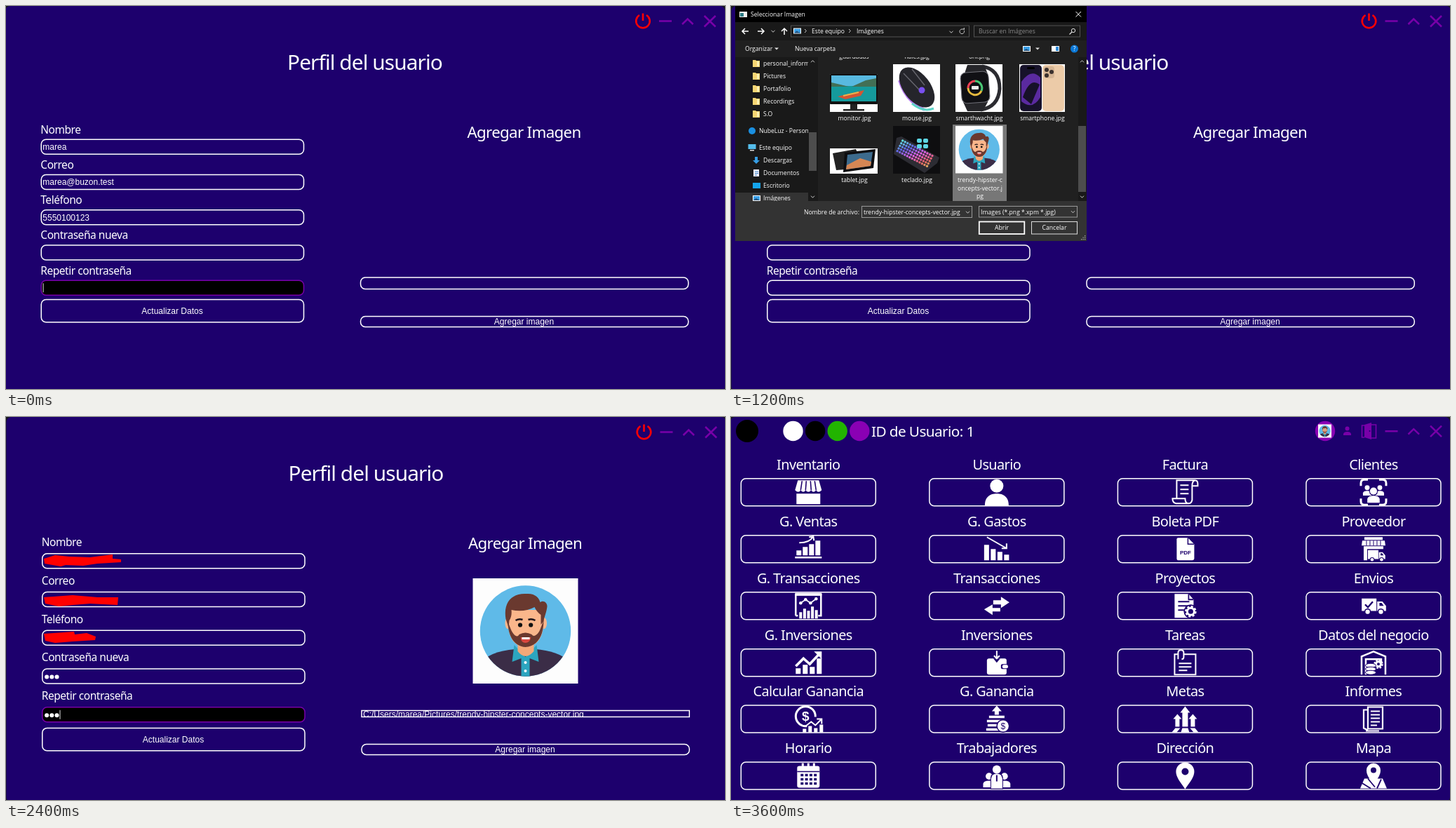
Recreate the animation shown at these times as an HTML page. Size 1025 by 546 pixels, loop 4.2 s.

```html
<!DOCTYPE html>
<html lang="es">
<head>
<meta charset="utf-8">
<title>Perfil del usuario</title>
<style>
html, body { margin: 0; width: 100%; height: 100%; overflow: hidden; background: #17171c; }
svg { display: block; }
text { fill: #fff; white-space: pre; }
.ui { font-family: "Noto Sans", "Open Sans", sans-serif; letter-spacing: -.03em; }
.in { font-family: "Liberation Sans", Arial, sans-serif; }
.os { font-family: "Open Sans", "Noto Sans", sans-serif; }
</style>
</head>
<body>
<svg id="stage" width="100%" height="100%" viewBox="0 0 1025 546"></svg>
<script>
const stage = document.getElementById('stage');
const NAVY = '#1d006d', PURPLE = '#7800a8', STEP = 600;

// y is the middle of the capitals
const text = (x, y, s, size, cls, anchor = 'start', fill = '#fff') =>
  `<text x="${x}" y="${y + size * .36}" class="${cls}" font-size="${size}" text-anchor="${anchor}" style="fill:${fill}">${s}</text>`;
const rect = (x, y, w, h, fill, r = 0, extra = '') =>
  `<rect x="${x}" y="${y}" width="${w}" height="${h}" rx="${r}" fill="${fill}" ${extra}/>`;
const frame = (x, y, w, h, r = 6.75, fill = 'none', stroke = '#fff', sw = 1.5) =>
  rect(x, y, w, h, fill, r, `stroke="${stroke}" stroke-width="${sw}"`);
const disc = (x, y, r, fill) => `<circle cx="${x}" cy="${y}" r="${r}" fill="${fill}"/>`;
const fill = (d, c = '#fff') => `<path d="${d}" fill="${c}"/>`;
const line = (d, w = 2, c = '#fff', extra = '') =>
  `<path d="${d}" fill="none" stroke="${c}" stroke-width="${w}" ${extra}/>`;
const group = (x, y, body, more = '') => `<g transform="translate(${x} ${y})${more}">${body}</g>`;
const clip = (x, y, w, h, body) =>
  `<svg x="${x}" y="${y}" width="${w}" height="${h}" viewBox="${x} ${y} ${w} ${h}">${body}</svg>`;

const backdrop = rect(-1, 0, 1026, 549, NAVY, 7);

const windowButtons =
  line('M931 21.5H949M964 26L971.7 18.5L979.5 26M995.5 14L1011.5 29.5M1011.5 14L995.5 29.5', 2.5, PURPLE);
const power = line('M903 13A9.8 9.8 0 1 0 913 13M908 10.5V21', 2.6, '#f00');

function avatar(x, y, size) {
  const skin = '#fab68b', hair = '#6a392f';
  return group(x, y,
    rect(0, 0, 150, 150, '#fdfdfd') +
    '<clipPath id="round"><circle cx="75" cy="75" r="64.7"/></clipPath><g clip-path="url(#round)">' +
    rect(0, 0, 150, 150, '#5fbae8') +
    fill('M8 150V124Q22 104 60 101H90Q128 104 142 124V150Z', '#3b2d47') +
    fill('M59 95L75 112L91 95L94 119L81 114V145H69V114L56 119Z', '#2ca5bf') +
    fill('M64 85H87V104Q75 118 64 104Z', '#f3a878') +
    disc(75, 120, 2, '#fff') + disc(75, 132, 2, '#fff') + '</g>' +
    `<ellipse cx="50" cy="64" rx="4" ry="8" fill="${skin}"/><ellipse cx="101.5" cy="64" rx="4" ry="8" fill="${skin}"/>` +
    fill('M51 45H100V72C98 88 88 98 75 98S53 88 51 72Z', skin) +
    fill('M47 58C43 34 56 21 76 22C88 21 94 27 96 34C100 31 106 34 106 40C105 49 102 54 101 61L97 66V52Q91 48 88 41Q73 49 55 45Q56 54 52 60L51 70Z', hair) +
    fill('M50 62L54 72C58 82 64 85 66 80Q75 75 84 80C87 85 94 80 97 70L101 60C101 82 92 97 75 98C59 97 50 82 50 62Z', hair) +
    fill('M68 84H83Q81 92 75 92Q69 92 68 84Z', '#d9473f') + rect(70, 84, 11, 3, '#fff') +
    line('M61 60Q66 57 71 59M79 59Q84 57 89 60', 2.6, '#21151a') +
    disc(67.5, 66.5, 3.1, '#111') + disc(82.7, 66.5, 3.1, '#111'),
    ` scale(${size / 150})`);
}

function form(dx, dy, o = {}) {
  const img = o.photo, pitch = img ? 54.75 : 50.25, top = img ? 178.5 : 176;
  const btn = img ? 459.5 : 434.6, add = img ? 474 : 450;
  const values = o.marks ? [] : ['marea', 'marea@buzon.test', '5550100123'];
  let s = backdrop + power + windowButtons +
    text(511.5, 80, 'Perfil del usuario', 29.8, 'ui', 'middle') +
    text(738.5, 180, 'Agregar Imagen', 22.3, 'ui', 'middle');
  ['Nombre', 'Correo', 'Teléfono', 'Contraseña nueva', 'Repetir contraseña'].forEach((label, i) => {
    const y = top + i * pitch, mid = y + (img ? 26.8 : 24.8), on = o.focus === i;
    s += text(49.3, y, label, 15.5, 'ui') +
      frame(50.25, mid - 10.5, 374.25, 21, 6.75, on ? '#000' : 'none', on ? PURPLE : '#fff') +
      text(52.3, mid, values[i] || '', 12, 'in');
    if (o.dots && i > 2) for (let k = 0; k < 3; k++) s += disc(56.6 + 7.2 * k, mid + 1, 3, '#fff');
    if (on) s += rect(o.dots ? 75 : 52.6, mid - 6.5, 1, 13, '#ddd');
  });
  s += frame(50.25, btn - 16.1, 374.25, 32.25) + text(237, btn, 'Actualizar Datos', 12, 'in', 'middle');
  if (img) s += avatar(664, 230, 150) +
    clip(505, 418, 467, 9.5, text(507.5, 423.8, 'C:/Users/marea/Pictures/trendy-hipster-concepts-vector.jpg', 12, 'in')) +
    frame(505.5, 418.5, 467.25, 9, 0);
  else s += frame(505.5, 387, 467.25, 16.5);
  s += frame(505.5, add - 7.5, 467.25, 15, 6.75, o.hover ? PURPLE : 'none', o.hover ? PURPLE : '#fff') +
    text(738.5, add, 'Agregar imagen', 12, 'in', 'middle');
  return group(dx, dy, s) + (o.marks || []).map(d => fill(d, '#f00')).join('');
}

const marksA = [
  'M54 202L70 197L90 199L120 200L152 196V202L164 203V207L130 209L110 212L85 211L78 213L55 209Z',
  'M54 257L95 254L130 257H160L159 268L120 266L95 268L75 270L56 266Z',
  'M54 309L97 306L98 310L115 308L128 313L127 318L95 320L70 322L56 319Z'];
const marksB = [
  'M52 203L65 199H95L160 202L162 206L174 208V212L130 213L110 212L70 215L55 212Z',
  'M53 256L75 253L100 254L143 251L145 256L180 259L179 264L150 266L120 265L90 268L53 264Z',
  'M53 312L110 310L135 311L157 309L156 317L135 320H110L80 323L60 322L53 319Z'];

const folder = (x, y) => fill(`M${x} ${y - 5}h4l1 1h5v9h-10z`, '#f7d673') + rect(x + 6, y - 3, 3, 7, '#fff0b5');
const picture = (x, y, w = 11) => rect(x, y - 4, w, 8, '#fff') + rect(x + 1, y - 3, w - 2, 6, '#3aa0e8') +
  fill(`M${x + 1} ${y + 3}l${w / 3} -3l${w / 2} 3z`, '#24507a');
const caret = (x, y, up = 1, c = '#ccc') => line(`M${x - 2.5} ${y + up * 1.3}l2.5 ${-up * 2.6}l2.5 ${up * 2.6}`, 1, c);

function thumbs() {
  const monitor = rect(141, 97, 68, 54, '#fff') + rect(141, 97, 68, 43, '#111', 1) +
    rect(143, 99, 64, 37, '#58b9e0') + rect(143, 114, 64, 22, '#159a9c') +
    fill('M143 115V109L156 112L168 115ZM172 115L192 106L207 103V115Z', '#426f55') +
    fill('M152 129L190 120L185 128L163 133Z', '#d35532') + line('M160 128L182 123', 2, '#e9b64b') +
    rect(170, 140, 10, 7, '#222') + rect(160, 147, 30, 2.5, '#222');
  const mouse = rect(231, 83, 67, 68, '#fff') +
    line('M240 106C246 126 258 140 276 148', 4, '#b77cf0') + line('M258 139Q274 152 289 146', 3, '#5ed4c8') +
    '<ellipse cx="265" cy="116" rx="19" ry="33" transform="rotate(-38 265 116)" fill="#25252b"/>' +
    line('M246 96L268 119M258 90L276 113', 1.4, '#65656d') + disc(272, 120, 4.5, '#7950f0');
  const watch = rect(320, 83, 67, 68, '#fff') +
    line('M358 86Q383 90 383 118Q381 144 356 148', 5, '#2b2b30') +
    fill('M333 96L337 84H361L366 97V137L359 150H337L331 137Z', '#252529') +
    rect(328, 94, 40, 44, '#101014', 8, 'transform="rotate(-4 348 116)" stroke="#707078"') +
    line('M338 117A10 10 0 0 1 348 107', 3, '#ef4053') + line('M348 107A10 10 0 0 1 357 121', 3, '#49c774') +
    line('M357 121A10 10 0 0 1 338 117', 3, '#e6ba3e') + rect(343, 114, 10, 5, '#eee', 1);
  const phone = rect(411, 83, 65, 68, '#fff') + rect(412, 84, 31, 66, '#17122b', 5) +
    fill('M414 108Q428 88 441 102V130Q430 149 414 136Z', '#5a2aa0') +
    fill('M416 130Q426 101 440 112L428 140Z', '#171129') + rect(422, 87, 11, 3, '#000', 1.5) +
    rect(444, 84, 31, 66, '#eccba8', 5) + rect(446, 86, 15, 17, '#d6b594', 4) +
    disc(450, 91, 3, '#3a302d') + disc(457, 94, 3, '#3a302d') + disc(450, 99, 3, '#3a302d');
  const tablet = rect(141, 203, 68, 36, '#fff') + fill('M145 210L178 204L190 231L150 234Z', '#222') +
    fill('M162 209L206 204L203 231L160 237Z', '#0d0d10') + fill('M166 212L202 208L199 228L164 233Z', '#3d6b8d') +
    fill('M165 227L184 217L200 222L199 228L164 233Z', '#d58654');
  let keys = '';
  for (let r = 0; r < 5; r++) for (let c = 0; c < 13; c++)
    keys += rect(c * 4.6, r * 4.8, 3.5, 3.5, `hsl(${180 + c * 13 + r * 14} 75% 65%)`, .7);
  const keyboard = rect(231, 171, 67, 68, '#0e0e10') + fill('M236 188L243 186L297 216L294 224L276 238L232 211Z', '#2c2c33') +
    group(244, 190, keys, ' rotate(27) scale(.86)') +
    [0, 1, 2, 3].map(i => rect(265 + i % 2 * 9, 189 + (i >> 1) * 8, 7, 6, '#5ed7e5', 2)).join('');
  return monitor + mouse + watch + phone + tablet + keyboard;
}

function fileDialog() {
  const os = (x, y, s, a, c) => text(x, y, s, 8.6, 'os', a, c);
  let s = rect(6, 0, 501, 335, '#333') + rect(6, 0, 501, 23, '#000') +
    rect(6, 23, 501, 26, '#191919') + rect(6, 49, 501, 24, '#202020') +
    rect(6, 73, 118, 205, '#191919') + rect(124, 73, 383, 205, '#202020');
  s += rect(12, 8, 11, 8, '#eee') + rect(13, 10, 5, 5, '#2c7c86') + os(28, 12, 'Seleccionar Imagen') +
    line('M491.5 8L499 15.5M499 8L491.5 15.5', 1);
  s += line('M16 36H25M20 32L16 36L20 40M38 36H47M43 32L47 36L43 40M76 41V32M72 36L76 32L80 36', 1.5) +
    caret(60, 36, -1) + frame(85.5, 28, 254, 16, 0, '#191919', '#535353', 1) + picture(89, 35.5) +
    line('M105 33l2.5 2.5l-2.5 2.5M168 33l2.5 2.5l-2.5 2.5', 1, '#ccc') + os(115, 36, 'Este equipo') + os(179, 36, 'Imágenes') +
    caret(314, 37, -1) + line('M332.3 35A3.3 3.3 0 1 1 329 33H332.3M332.3 31V34', 1, '#ccc') +
    frame(346.5, 28, 151, 16, 0, '#191919', '#535353', 1) + os(353, 36, 'Buscar en Imágenes', 'start', '#8a8a8a') +
    '<circle cx="488" cy="35" r="2.7" fill="none" stroke="#ddd"/>' + line('M486 37L482.5 40.5', 1.2, '#ddd');
  s += os(20, 61, 'Organizar') + fill('M62 59.5h6l-3 3zM434 59.5h6l-3 3z', '#ddd') + os(91, 61, 'Nueva carpeta') +
    picture(416, 61) + rect(457, 57, 11, 8, '#fff') + rect(463, 58, 4, 6, '#2f8ad8') +
    disc(489.5, 61, 5.5, '#0a78d7') + os(489.5, 61, '?', 'middle');

  let tree = rect(6, 266, 104, 12, '#333');
  ['personal_informe', 'Pictures', 'Portafolio', 'Recordings', 'S.O'].forEach((n, i) =>
    tree += folder(31, 82 + 18 * i) + os(46, 82 + 18 * i, n));
  tree += disc(30, 178, 5, '#1a8fe0') + os(40, 178, 'NubeLuz - Personal') +
    rect(24.5, 197, 11, 7, '#55bdea') + rect(27, 205, 6, 1.5, '#ddd') + os(40, 202, 'Este equipo');
  ['Descargas', 'Documentos', 'Escritorio', 'Imágenes'].forEach((n, i) => tree += os(46, 220 + 18 * i, n));
  tree += fill('M34 215h4v5h3l-5 5l-5 -5h3z', '#369ee5') + rect(32, 233, 8, 10, '#eef') +
    line('M34 236h5M34 238.5h5M34 241h3', 1, '#3c86c4') + rect(31, 252, 11, 8, '#14a5ec') + picture(31, 274);
  s += clip(6, 73, 104, 205, tree) + rect(111, 180, 11, 55, '#4d4d4d') + caret(116.5, 79) + caret(116.5, 272, -1);

  let list = rect(316, 169, 77, 109, '#777') + thumbs() + avatar(320, 171, 67.5);
  [[175.5, 72, 'guardadas'], [265, 72, 'nales.jpg'], [354, 72, 'oni.png'],
   [176, 160, 'monitor.jpg'], [265, 160, 'mouse.jpg'], [354, 160, 'smarthwacht.jpg'], [444, 160, 'smartphone.jpg'],
   [176, 248, 'tablet.jpg'], [265, 248, 'teclado.jpg'],
   [355, 248, 'trendy-hipster-c'], [355, 259.5, 'oncepts-vector.j'], [355, 271, 'pg']]
    .forEach(([x, y, n]) => list += os(x, y, n, 'middle'));
  s += clip(124, 73, 371, 205, list) + rect(495, 73, 12, 205, '#191919') + rect(495, 171, 11, 94, '#4d4d4d') +
    caret(500.5, 79) + caret(500.5, 272, -1);

  s += os(183, 293.5, 'Nombre de archivo:', 'end') + frame(186.5, 285.5, 157, 16, 0, '#333', '#999', 1) +
    os(189, 294, 'trendy-hipster-concepts-vector.jpg') + caret(337.5, 294, -1) +
    frame(353.5, 285.5, 140, 15.5, 0, '#333', '#999', 1) + os(356, 293.5, 'Images (*.png *.xpm *.jpg)') + caret(487.5, 293.5, -1) +
    frame(353.8, 307.5, 64.5, 17.5, 0, '#333', '#fff', 1.8) + os(386, 316, 'Abrir', 'middle') +
    frame(428.5, 307.5, 65, 17.5, 0, '#333', '#ddd', 1) + os(461, 316, 'Cancelar', 'middle');
  for (let r = 0; r < 3; r++) for (let c = 2 - r; c < 3; c++)
    s += rect(499 + 2.5 * c, 327 + 2.5 * r, 1.3, 1.3, '#aaa');
  return s;
}

function messageBox() {
  const os = (x, y, s, a) => text(x, y, s, 8.5, 'os', a, '#111');
  return rect(399, 216.5, 226, 93, '#10003f', 0, 'opacity=".55"') + rect(400, 217, 224, 91, '#fff') +
    rect(400, 276, 224, 32, '#f0f0f0') + line('M400 276H624', 1, '#dfdfdf') +
    frame(405.5, 222.5, 10.5, 8, 0, '#eee', '#aaa', 1) + rect(407, 224, 4, 5.5, '#3d7a80') + os(421, 227.5, 'Información') +
    line('M609 223.5L616.5 231M616.5 223.5L609 231', 1, '#222') +
    disc(420, 259, 11.5, '#0078d7') + rect(419.2, 256.5, 1.7, 9, '#fff') + disc(420, 253.3, 1.2, '#fff') +
    os(446, 253, 'Actualización realizada en la base de datos.') +
    frame(561, 284, 53, 14, 0, '#e1e1e1', '#0078d7', 1.8) + os(587.5, 291, 'OK', 'middle');
}

// Menu icons, centred on 0,0
const bars = (x, step, w, base, tops) => fill(tops.map((t, i) => `M${x + i * step} ${base}V${t}h${w}V${base}z`).join(''));
const man = (x, y, k = 1) => group(x, y, disc(0, -6, 4.6, '#fff') + fill('M-8 9V4Q-7 0 0 0T8 4V9Z'), ` scale(${k})`);
const gear = (x, y, r) => `<circle cx="${x}" cy="${y}" r="${r}" fill="none" stroke="#fff" stroke-width="3"/>` +
  `<circle cx="${x}" cy="${y}" r="${r + 2}" fill="none" stroke="#fff" stroke-width="2.5" stroke-dasharray="${(r + 2) * .45} ${(r + 2) * .3354}"/>`;
const coin = (x, y, size, c) => text(x, y, '$', size, 'in', 'middle', c);
const van = (x, y, k) => group(x, y,
  fill('M-16 -10H4V7H-16ZM5 -6H12L17 0V7H5Z') + fill('M8 -4H11L14 0H8Z', NAVY) +
  disc(-8, 8, 4.5, NAVY) + disc(10, 8, 4.5, NAVY) + disc(-8, 8, 3, '#fff') + disc(10, 8, 3, '#fff'), ` scale(${k})`);

const menu = [
  ['Inventario', fill('M-15 -17H15L19 -3Q14 2 11 -3Q7 2 4 -3Q0 2 -4 -3Q-7 2 -11 -3Q-14 2 -19 -3ZM-17 2H17V17H-17Z') +
    line('M-9 -16L-11 -3M-3 -16L-4 -3M3 -16L4 -3M9 -16L11 -3', 1.6, NAVY)],
  ['Usuario', disc(0, -9, 9.5, '#fff') + fill('M-17 19C-17 6 -9 2 0 2S17 6 17 19Z')],
  ['Factura', line('M-12 8V-17H14Q18 -17 18 -12V-9H10M14 -17Q10 -16 10 -9V11Q9 16 5 16H-13Q-18 15 -18 9H0Q0 16 5 16M-7 -10H5M-7 -4H5M-7 2H5')],
  ['Clientes', line('M-18 -9V-13Q-18 -18 -13 -18H-8M8 -18H13Q18 -18 18 -13V-9M18 9V13Q18 18 13 18H8M-8 18H-13Q-18 18 -18 13V9', 3) +
    man(-9, -2, .75) + man(9, -2, .75) + disc(0, -1, 6, NAVY) + man(0, 5, 1.1)],
  ['G. Ventas', bars(-17, 9, 7, 9, [2, -3, -7, -12]) + line('M-19 12H19', 2.5) + line('M-13 -9Q2 -9 6 -17M1 -17L7 -18L8 -12')],
  ['G. Gastos', bars(-18, 9.5, 7, 16, [-6, 0, 4, 8]) + line('M-14 -17L14 -1M14 -8V-1H7')],
  ['Boleta PDF', fill('M-12 -14Q-12 -16 -10 -16H4L13 -7V13Q13 16 10 16H-10Q-12 16 -12 13Z') + line('M4 -16V-7H13', 1.5, NAVY) +
    `<g font-weight="700">${text(.5, 5, 'PDF', 8, 'in', 'middle', NAVY)}</g>`],
  ['Proveedor', fill('M-13 -17H13V-13H-13ZM-16 -12H16L17 -5H-17ZM-14 -4H14V16H-14Z') +
    line('M-10 -12V-5M-5 -12V-5M0 -12V-5M5 -12V-5M10 -12V-5', 1, NAVY) + rect(-9, 0, 26, 17, NAVY) + van(4, 9, .75)],
  ['G. Transacciones', line('M-18 14V-16H18V14H14M-18 14H-15', 2.5) + line('M-19 -16.5H19', 4) + line('M-11 -4L-4 -9L3 -4L11 -10', 1.6) +
    [[-11, -4], [-4, -9], [3, -4], [11, -10]].map(p => disc(...p, 2.3, '#fff')).join('') +
    bars(-13, 5.6, 4, 18, [9, 4, 7, 1, 6])],
  ['Transacciones', fill('M-5 -8H6V-13L18 -5L6 3V-2H-5ZM5 3H-6V-2L-18 5L-6 13V8H5Z')],
  ['Proyectos', fill('M-15 -17H5L12 -9V17H-15Z') + line('M5 -17V-9H12M-10 -6H6M-10 0H6M-10 6H0', 1.8, NAVY) +
    disc(8, 8, 10, NAVY) + gear(8, 8, 5)],
  ['Envios', van(0, 0, 1.05) + line('M-12 -2L-8 2L-1 -6', 2.4, NAVY)],
  ['G. Inversiones', bars(-18, 10, 7, 16, [8, 3, 6, -6]) + line('M-18 5L-7 -6L2 2L16 -13', 3.5) + fill('M8 -16H19V-5Z')],
  ['Inversiones', rect(-14, -6, 28, 23, '#fff', 3) + rect(6, 2, 10, 7, NAVY, 2) + rect(8, 3, 8, 5, '#fff', 2) +
    fill('M-5 -6H5L0 0Z', NAVY) + line('M0 -17V-6M-4 -10L0 -6L4 -10')],
  ['Tareas', line('M-10 -12H-15V17H15V-12H-2M-10 -5V-14Q-10 -18 -6 -18T-2 -14V-8Q-2 -5 -5 -5M-9 1H9M-9 6H9M-9 11H3')],
  ['Datos del negocio', line('M-17 17V-9L0 -16L17 -9V17M-11 17V-5H11V0', 2.5) + gear(7, 2, 3.5) +
    [0, 5, 10].map(y => `<ellipse cx="-4" cy="${4 + y}" rx="7.5" ry="3" fill="#fff" stroke="${NAVY}"/>`).join('')],
  ['Calcular Ganancia', line('M-2 10A14 14 0 1 1 10 -3', 3) + `<g font-weight="700">${coin(-4, -4, 19)}</g>` +
    bars(-8, 8, 5, 19, [14, 10, 13, 8]) + line('M-5 11L4 4L10 9L18 1M12 0H19V7')],
  ['G. Ganancia', fill('M0 -19L7 -11H3V-6H-3V-11H-7Z') + line('M-11 -3H11M-14 3H8M-13 9H3M-15 15H5', 3.5) +
    disc(9, 10, 9.5, NAVY) + disc(9, 10, 8, '#fff') + coin(9, 10, 12, NAVY)],
  ['Metas', fill('M0 -18L7 -9H4V11H-4V-9H-7ZM-11 -7L-5 0H-8V11H-14V0H-17ZM11 -7L17 0H14V11H8V0H5ZM-14 13H-7L-12 19H-19ZM-4 13H4L6 19H-6ZM7 13H14L19 19H12Z')],
  ['Informes', line('M-8 -13H-14V13L-8 16M-8 -17H13V14H-8ZM-11 17H8', 2.2) + line('M-4 -11H9M-4 -6H9M-4 -1H9M-4 4H9M-4 9H5', 1.8)],
  ['Horario', rect(-16, -14, 32, 31, '#fff', 3) + line('M-16 -6H16', 1.5, NAVY) + line('M-8 -18V-10M0 -18V-10M8 -18V-10', 3) +
    line('M-11 -1H12M-11 5H12M-11 11H12', 3.5, NAVY, 'stroke-dasharray="4 2.3"')],
  ['Trabajadores', man(-11, 7, 1.05) + man(11, 7, 1.05) + fill('M-9 19V3Q-8 -5 0 -5T9 3V19Z', NAVY) + disc(0, -9, 7, NAVY) +
    disc(0, -9, 6, '#fff') + fill('M-8 18V4Q-7 -3 0 -3T8 4V18Z') + line('M0 -1V8', 2, NAVY)],
  ['Dirección', fill('M0 19C-5 11 -13 3 -13 -6A13 13 0 0 1 13 -6C13 3 5 11 0 19Z') + disc(0, -6, 5, NAVY)],
  ['Mapa', fill('M-13 4H13L19 18H-19Z') + line('M-17 10L-4 18M5 18L11 5M-8 4L2 16', 1.8, NAVY) +
    fill('M0 12C-5 5 -10 0 -10 -8A10 10 0 0 1 10 -8C10 0 5 5 0 12Z') + disc(0, -8, 4, NAVY)]
];

function dashboard() {
  let s = backdrop + disc(23, 20, 16, '#000');
  ['#fff', '#000', '#22b400', '#8a00b4'].forEach((c, i) => s += disc(88.5 + 31.6 * i, 20, 14.2, c));
  s += text(200, 21, 'ID de Usuario: 1', 20.8, 'ui') + disc(847, 20, 14.2, '#8a00b4') + avatar(837, 10.5, 19) +
    disc(878.5, 16.5, 3, PURPLE) + fill('M873 26V24Q874 21 878.5 21T884 24V26Z', PURPLE) +
    line('M903 12H899.5V29H903M913 11H919.5V30H913', 1.6, PURPLE) + fill('M903 11L913 8V32L903 29Z', PURPLE) +
    disc(910.5, 20, 1, NAVY) + group(1.5, -1.3, windowButtons);
  menu.forEach(([label, icon], i) => {
    // rows snap to a screen grid of 3/4 px
    const x = 110.3 + 268.55 * (i % 4), y = 20.25 + .75 * Math.round(116 + 107.85 * Math.floor(i / 4));
    s += text(x, y - 39.3, label, 19.9, 'ui', 'middle') + frame(x - 96, y - 19.5, 192, 39) + group(x, y, icon);
  });
  return s;
}

const scenes = [
  form(0, 0, { focus: 4 }),
  form(-2.25, 0, { hover: true }),
  form(1.5, 0) + fileDialog(),
  form(.75, -2.25, { photo: true, focus: 3 }),
  form(1.5, 0, { photo: true, focus: 4, dots: true, marks: marksA }),
  form(0, 0, { photo: true, dots: true, marks: marksB }) + messageBox(),
  dashboard()
];

let shown = -1;
function draw(now) {
  const i = Math.floor(now / STEP) % scenes.length;
  if (i !== shown) stage.innerHTML = scenes[shown = i];
}
const start = performance.now();
function tick() {
  draw(performance.now() - start);
  requestAnimationFrame(tick);
}
tick();
</script>
</body>
</html>
```
